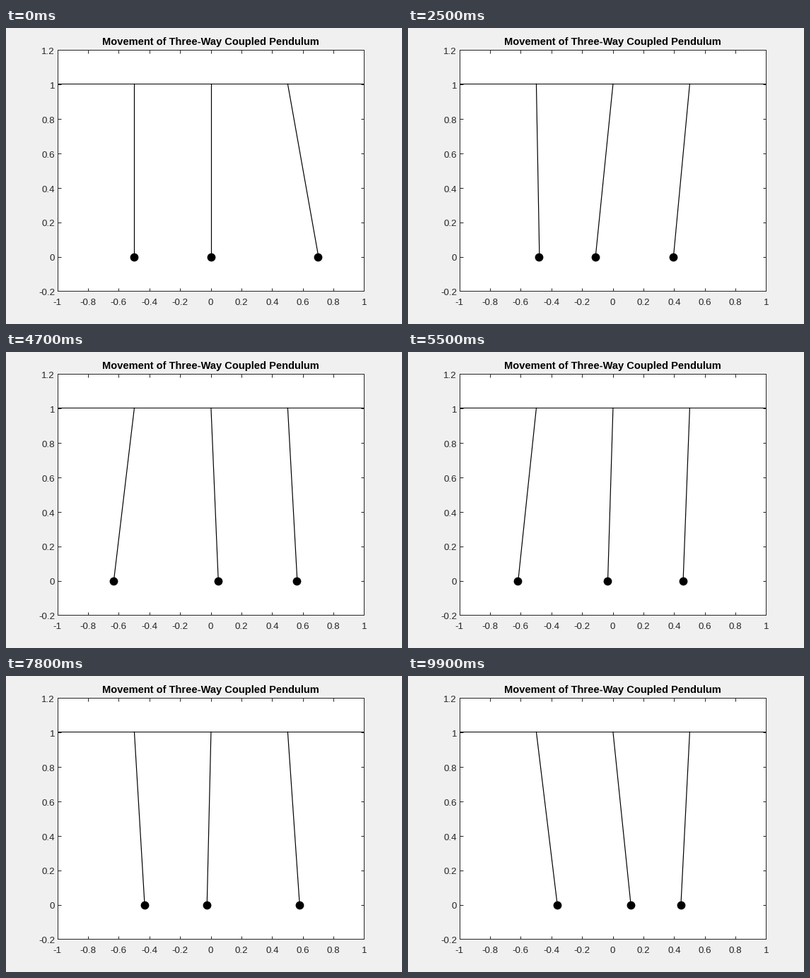
A matplotlib script for the animation above (10000 ms loop, 560 by 420 pixels).

```python
import numpy as np
import matplotlib.pyplot as plt
from matplotlib.animation import FuncAnimation
from matplotlib.transforms import Affine2D

W, H, DPI = 560, 420, 80
FRAMES = 100
LEFT, RIGHT, TOP, BOTTOM = 72.6, 506.45, 31.2, 373.49
PX = 72 / DPI  # one pixel in points
INK = "#262626"

plt.rcParams["font.family"] = "Liberation Sans"

# Three equal pendulums in a row, joined by weak springs
G, K, AMP = 9.8, 1.0, 0.2
PIVOTS = np.array([-0.5, 0.0, 0.5])
MODES = np.array([[1, 1, 1], [-1, 0, 1], [1, -2, 1]]) / np.array([[3], [2], [6]])
OMEGA = np.sqrt(G + K * np.array([0, 1, 3]))
TIMES = np.linspace(0, 20, FRAMES)


def bobs(t):
    return PIVOTS + AMP * np.cos(OMEGA * t) @ MODES


fig = plt.figure(figsize=(W / DPI, H / DPI), dpi=DPI, facecolor="#f0f0f0")
ax = fig.add_axes([LEFT / W, 1 - BOTTOM / H, (RIGHT - LEFT) / W, (BOTTOM - TOP) / H])
ax.set(xlim=(-1, 1), ylim=(-0.2, 1.2))

xticks = np.round(np.linspace(-1, 1, 11), 1) + 0.0
yticks = np.round(np.linspace(-0.2, 1.2, 8), 1) + 0.0
ax.set_xticks(xticks)
ax.set_yticks(yticks)
ax.tick_params(direction="in", length=4.5 * PX, width=PX, color=INK,
               top=True, right=True, labelbottom=False, labelleft=False)
for spine in ax.spines.values():
    spine.set(linewidth=PX, edgecolor=INK)


def label(x, y, text, px, **kw):
    fig.text(x / W, 1 - y / H, text, fontsize=px * PX, va="baseline", **kw)


for v in xticks:
    x = LEFT + (v + 1) / 2 * (RIGHT - LEFT)
    label(x, 393, f"{v:g}", 13.33, ha="center", color=INK)
for v in yticks:
    y = BOTTOM - (v + 0.2) / 1.4 * (BOTTOM - TOP)
    label(69, y + 5.8, f"{v:g}", 13.33, ha="right", color=INK)
label(289.7, 24, "Movement of Three-Way Coupled Pendulum", 14.67,
      ha="center", weight="bold", color="black")

# Lines sit a fraction of a pixel off the tick grid
line_style = dict(color="black", transform=ax.transData + Affine2D().translate(0.4, 0.7))
ax.plot([-1, 1], [1, 1], lw=PX, **line_style)
rods = [ax.plot([], [], lw=1.2 * PX, **line_style)[0] for _ in PIVOTS]
balls, = ax.plot([], [], "o", color="black", ms=11.8 * PX, mew=0)


def update(i):
    xs = bobs(TIMES[i])
    for rod, pivot, x in zip(rods, PIVOTS, xs):
        rod.set_data([pivot, x], [1, 0])
    balls.set_data(xs, np.zeros(3))
    return [*rods, balls]


anim = FuncAnimation(fig, update, frames=FRAMES, interval=100,
                     repeat=True, repeat_delay=0)
plt.show()
```
